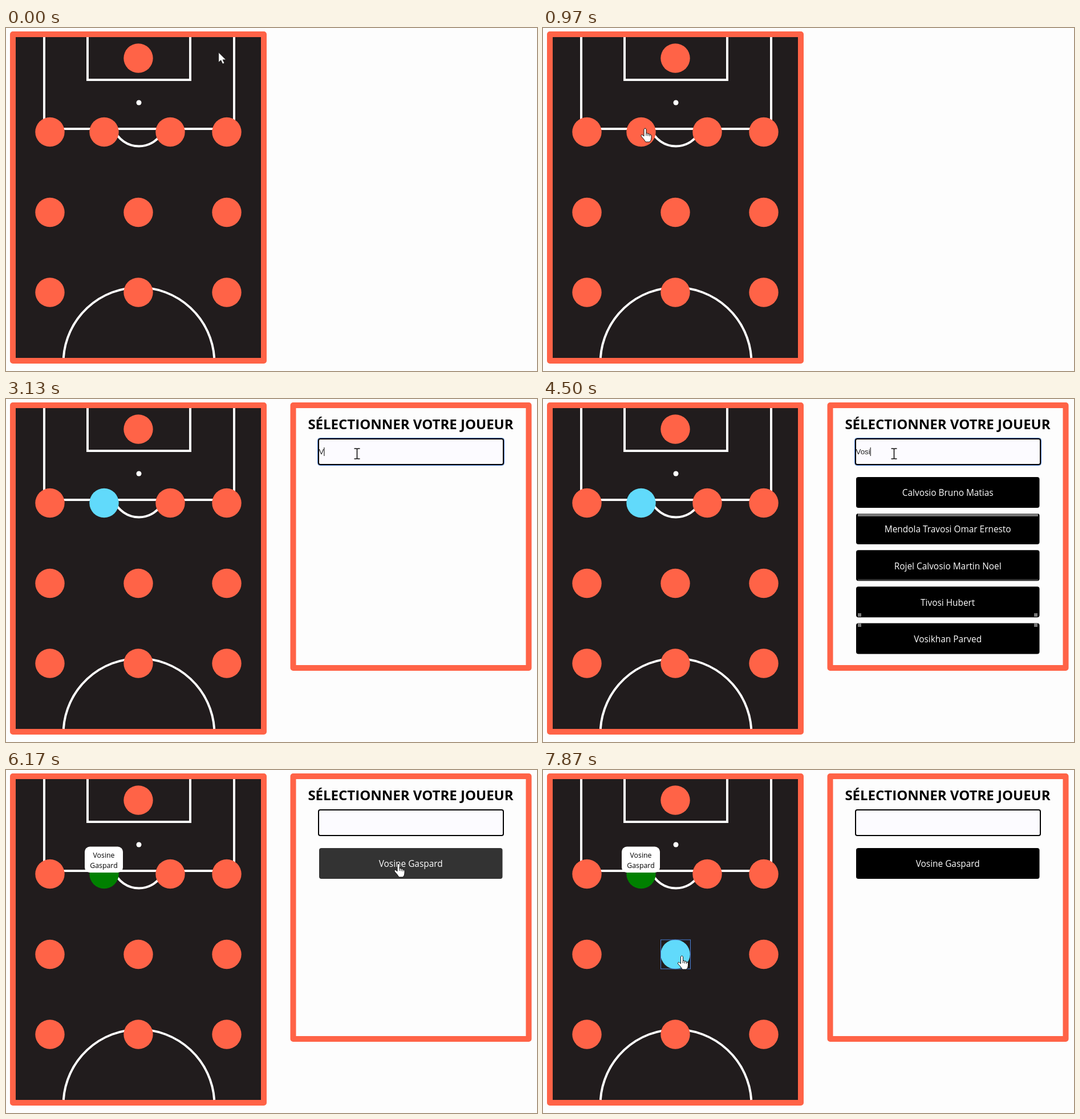
Recreate the animation shown at these times as an HTML page. Size 931 px wide and 602 px high, loop 8 s.

```html
<!DOCTYPE html>
<html lang="fr">
<head>
<meta charset="utf-8">
<title>Composition d'équipe</title>
<style>
  html, body { margin: 0; width: 100%; height: 100%; overflow: hidden; background: #fdfdfd; }
  svg { display: block; width: 100%; height: 100%; font-family: "Open Sans", "Noto Sans", sans-serif; }
  .frame { stroke: #ff6347; stroke-width: 10; stroke-linejoin: round; }
  .lines { fill: none; stroke: #fff; stroke-width: 4; }
  .focus { fill: none; stroke: #4a80d8; }
  .middle { text-anchor: middle; }
</style>
</head>
<body>
<svg viewBox="0 0 931 602">
  <defs>
    <g id="arrow" fill="#fff" stroke="#222" stroke-width=".8">
      <path d="M0 0V17L4 13.5L7 20L10 18.5L7.2 12.7H12.7Z"/>
    </g>
    <g id="hand" fill="#fff" stroke="#111">
      <path d="M-2 1Q0-3 2 1V8Q4 6 5 9Q7 7 8 10Q10 9 11 12V16Q11 20 8 23H1Q-2 18-7 13Q-7 9-4 11L-2 13Z"/>
      <path d="M2 8V12M5 9V12.5M8 10V13" fill="none"/>
    </g>
    <path id="beam" d="M-5-9H-1L0-8L1-9H5M0-8V8M-5 9H-1L0 8L1 9H5" fill="none" stroke="#111" stroke-width="1.6"/>
  </defs>

  <rect class="frame" x="12" y="11" width="440" height="573" fill="#211c1d"/>
  <g class="lines">
    <path d="M67 16V177H400V16M143 16V91H323V16"/>
    <path d="M189 177A47 47 0 0 0 277 177M100.8 579A132.5 132.5 0 0 1 365.2 579"/>
  </g>
  <circle cx="233" cy="131" r="4.5" fill="#fff"/>
  <g id="players"></g>
  <rect id="playerFocus" class="focus" width="52" height="51"/>
  <g id="label" class="middle" font-size="12.3">
    <rect x="138" y="134.5" width="67" height="45.5" rx="9" fill="#fff"/>
    <text x="171.5" y="154">Vosine</text>
    <text x="171.5" y="171.5">Gaspard</text>
  </g>

  <g id="panel">
    <rect class="frame" x="503.5" y="11" width="413" height="461" fill="#fdfdfd"/>
    <text class="middle" x="709.5" y="53" font-size="24" font-weight="700">SÉLECTIONNER VOTRE JOUEUR</text>
    <rect id="inputFocus" class="focus" x="546.5" y="68.5" width="327" height="48" rx="4"/>
    <rect x="548" y="70" width="324" height="45" rx="3" fill="#fcfbff" stroke="#000" stroke-width="2"/>
    <text id="typed" x="548.5" y="97" font-size="13.33" font-family="'Liberation Sans', Arial, sans-serif" fill="#222"></text>
    <rect id="caret" y="85" width="1" height="15"/>
    <g id="results" class="middle" font-size="15.4"></g>
    <g id="flash" fill="#777">
      <path d="M552 201H868V206H552ZM552 376h6v6h-6zM861 376h6v6h-6zM552 394h6v6h-6zM861 394h6v6h-6z"/>
      <path d="M552 316H868V319H552Z" fill="#333"/>
    </g>
  </g>
  <use id="cursor"/>
</svg>
<script>
const LOOP = 8000;
const $ = id => document.getElementById(id);
const show = (el, visible) => el.setAttribute("visibility", visible ? "inherit" : "hidden");

function add(parent, tag, attrs) {
  const el = document.createElementNS("http://www.w3.org/2000/svg", tag);
  for (const name in attrs) el.setAttribute(name, attrs[name]);
  return parent.appendChild(el);
}

const spots = [[232, 53],
  ...[77, 172, 288, 387].map(x => [x, 182.5]),
  ...[323.5, 464].flatMap(y => [77, 232, 387].map(x => [x, y]))];
const DEFENDER = 2, MIDFIELDER = 6;
const players = spots.map(([cx, cy]) => add($("players"), "circle", { cx, cy, r: 25.7 }));

const matches = ["Calvosio Bruno Matias", "Mendola Travosi Omar Ernesto",
  "Rojel Calvosio Martin Noel", "Tivosi Hubert", "Vosikhan Parved"];
const chosen = "Vosine Gaspard";
const buttons = matches.map((name, i) => {
  const y = 137 + i * 64.1;
  const group = add($("results"), "g", {});
  const box = add(group, "rect", { x: 549, y, width: 321.5, height: 54, rx: 4 });
  const text = add(group, "text", { x: 709.7, y: y + 33.3, fill: "#fff" });
  return { group, box, text };
});

// Moments of the interaction, in ms
const PRESS = 1630, OPEN = 1730, FOCUS = 2300, LIST = 4500, NARROW = 4730,
  BLUR = 6070, PICK = 6130, PRESS_NEXT = 7700, SELECT_NEXT = 7800;
const keys = [[FOCUS, ""], [3130, "V"], [3400, "Vo"], [3630, "Vos"], [LIST, "Vosi"], [NARROW, "Vosin"]];
const route = [[0, 373, 43], [400, 310, 62], [830, 226, 91], [970, 179, 177], [1100, 179, 179],
  [1780, 179, 179], [2030, 430, 125], [2270, 615.5, 96], [5570, 615.5, 96], [5600, 617, 96],
  [5930, 688, 165], [6700, 688, 165], [6970, 317, 147], [7250, 241, 348], [7530, 243.5, 327], [LOOP, 243.5, 327]];

function cursorAt(t) {
  const i = route.findIndex(point => point[0] > t);
  const [t0, x0, y0] = route[i - 1], [t1, x1, y1] = route[i];
  const p = (t - t0) / (t1 - t0);
  return [x0 + (x1 - x0) * p, y0 + (y1 - y0) * p];
}

function render(t) {
  const [x, y] = cursorAt(t);
  const inColumn = t >= OPEN && x > 547 && x < 873;
  const overInput = inColumn && y > 69 && y < 116;
  const overButton = inColumn && t >= LIST && y > 137 && y < 191;
  const overPlayer = spots.some(([cx, cy]) => Math.hypot(x - cx, y - cy) < 26);
  const shape = overInput ? "beam" : overButton || overPlayer ? "hand" : "arrow";
  $("cursor").setAttribute("href", "#" + shape);
  $("cursor").setAttribute("transform", `translate(${x} ${y})`);

  players.forEach((player, i) => {
    let fill = "#ff6347";
    if (i === DEFENDER && t >= OPEN) fill = t < PICK ? "#61dafb" : "#008000";
    if (i === MIDFIELDER && t >= SELECT_NEXT) fill = "#61dafb";
    player.setAttribute("fill", fill);
  });
  const [fx, fy] = spots[t < PRESS_NEXT ? DEFENDER : MIDFIELDER];
  $("playerFocus").setAttribute("x", fx - 25.5);
  $("playerFocus").setAttribute("y", fy - 25.5);
  show($("playerFocus"), t >= PRESS && t < FOCUS || t >= PRESS_NEXT);
  show($("label"), t >= PICK);
  show($("panel"), t >= OPEN);

  const focused = t >= FOCUS && t < BLUR;
  const [keyTime, text] = keys.findLast(key => key[0] <= t) || keys[0];
  $("typed").textContent = t < PICK ? text : "";
  show($("inputFocus"), focused);
  show($("caret"), focused && Math.floor((t - keyTime) / 500) % 2 === 0);
  $("caret").setAttribute("x", 548.5 + (text ? $("typed").getComputedTextLength() : 0));

  const names = t < LIST ? [] : t < NARROW ? matches : [chosen];
  buttons.forEach(({ group, box, text }, i) => {
    show(group, i < names.length);
    text.textContent = names[i] || "";
    box.setAttribute("fill", i === 0 && overButton ? "#333" : "#000");
  });
  show($("flash"), t >= LIST && t < LIST + 30);
}

function tick(now) {
  render(now % LOOP);
  requestAnimationFrame(tick);
}
render(0);
requestAnimationFrame(tick);
</script>
</body>
</html>
```
